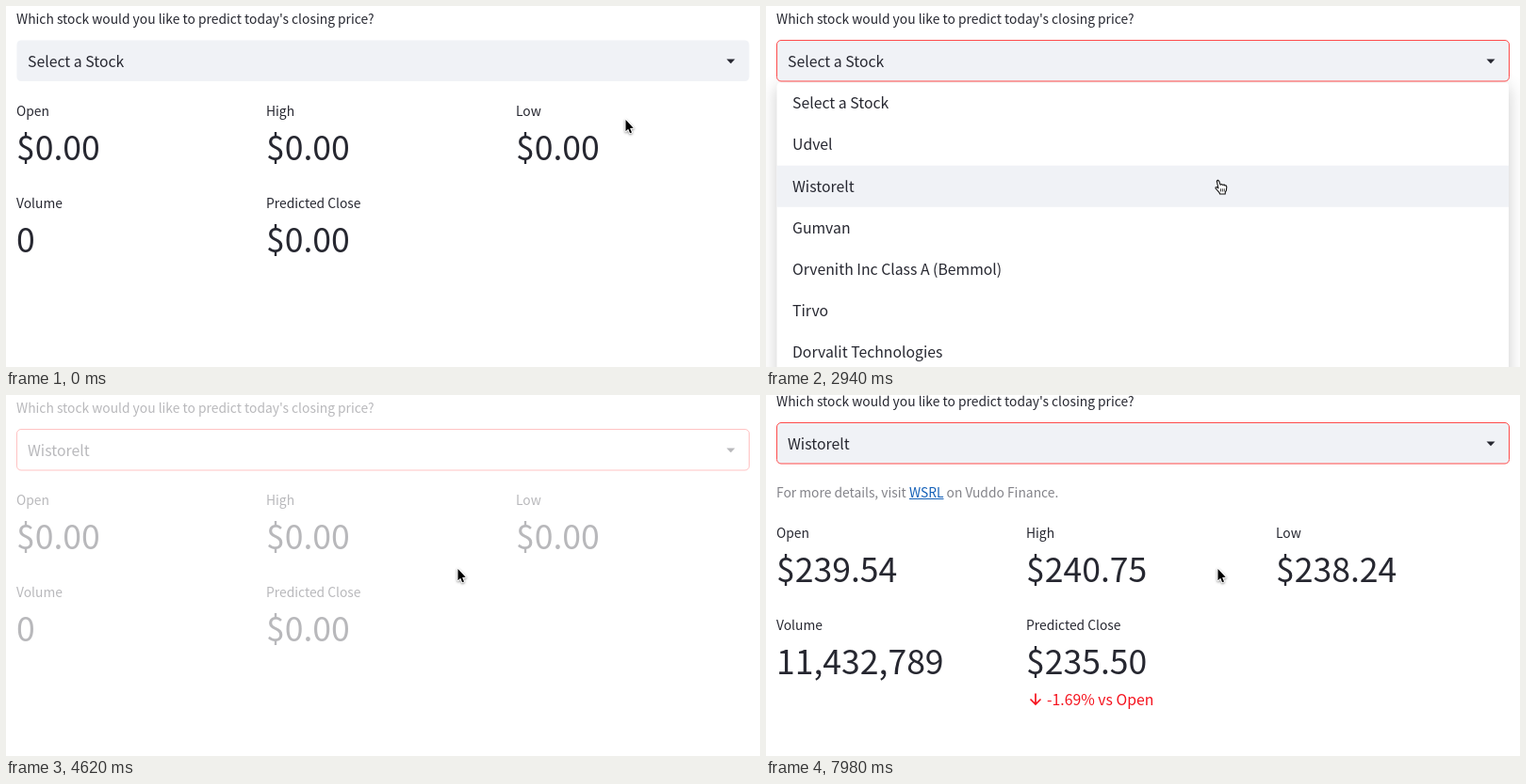
Recreate the animation shown at these times as an HTML page with a canvas. Size 800x384 px, loop 8000 ms.

```html
<!DOCTYPE html>
<html lang="en">
<head>
<meta charset="utf-8">
<title>Closing price predictor</title>
<style>
  html, body { margin: 0; width: 100%; height: 100%; overflow: hidden; background: #fff; }
  canvas { display: block; }
</style>
</head>
<body>
<canvas id="stage" width="800" height="384"></canvas>
<script>
const ctx = document.getElementById('stage').getContext('2d');

const LOOP = 8000;
const OPEN_AT = 2030, CLOSE_AT = 3150, FADE_AT = 3600, RESULT_AT = 7350;
const FAMILY = '"Noto Sans CJK JP", "Noto Sans CJK SC", "Noto Sans CJK", "Open Sans", sans-serif';
const SMALL = 13.83, BODY = 15.8, BIG = 35.55;
const INK = '#262730', PANEL = '#f0f2f6', RED = '#ff4b4b';
const ROW_TOP = 81.5, ROW = 44.1;
const PICK = 'Wistorelt';
const OPTIONS = ['Select a Stock', 'Udvel', PICK, 'Gumvan',
  'Orvenith Inc Class A (Bemmol)', 'Tirvo', 'Dorvalit Technologies'];
const EMPTY = ['$0.00', '$0.00', '$0.00', '0', '$0.00'];
const RESULT = ['$239.54', '$240.75', '$238.24', '11,432,789', '$235.50'];
const LABELS = ['Open', 'High', 'Low', 'Volume', 'Predicted Close'];

const clamp = v => Math.max(0, Math.min(1, v));
const ease = v => v * v * (3 - 2 * v);
const progress = (t, from, to) => clamp((t - from) / (to - from));

// Draws a line of text and returns the x where it ends.
function text(str, x, y, size, color = INK) {
  ctx.font = `400 ${size}px ${FAMILY}`;
  ctx.fillStyle = color;
  ctx.fillText(str, x, y);
  return x + ctx.measureText(str).width;
}

function roundBox(x, y, w, h, r) {
  ctx.beginPath();
  ctx.roundRect(x, y, w, h, r);
}

function pointer(t) {
  const up = ease(progress(t, 140, 1400));
  const down = ease(progress(t, 2170, 2660));
  return {
    x: 657 - 115 * up - 63 * down,
    y: 121 - 67 * up + 131 * down
  };
}

function opacity(t) {
  if (t >= RESULT_AT) return 1;
  return 1 - 0.67 * Math.pow(progress(t, FADE_AT, FADE_AT + 1000), 1.7);
}

function drawSelect(t, top, alpha) {
  const focused = t >= OPEN_AT;
  roundBox(11.5, top, 777, 43.5, 4.5);
  if (alpha > 0.34) {
    ctx.fillStyle = PANEL;
    ctx.fill();
  }
  if (focused) {
    ctx.strokeStyle = RED;
    ctx.lineWidth = 1;
    ctx.stroke();
  }
  text(t < CLOSE_AT ? OPTIONS[0] : PICK, 23, top + 28, BODY);

  ctx.fillStyle = INK;
  ctx.beginPath();
  ctx.moveTo(764.5, top + 20);
  ctx.lineTo(773.5, top + 20);
  ctx.lineTo(769, top + 24.8);
  ctx.fill();

  const caretOn = t > FADE_AT && (t - 4060 + 1050) % 1050 < 490;
  if (caretOn) ctx.fillRect(94, top + 10.5, 1, 22);
}

function drawMetrics(values, shift) {
  LABELS.forEach((label, i) => {
    const x = 11 + 265 * (i % 3);
    const y = 117 + shift + 98 * Math.floor(i / 3);
    text(label, x, y, SMALL);
    text(values[i], x, y + 47, BIG);
  });
}

function drawCaption() {
  const grey = '#838389', blue = '#1460b8', y = 109;
  const start = text('For more details, visit ', 11, y, SMALL, grey);
  const end = text('WSRL', start, y, SMALL, blue);
  ctx.fillRect(start, y + 1, end - start, 1);
  text(' on Vuddo Finance.', end, y, SMALL, grey);
}

function drawDelta() {
  const red = '#f5121d';
  ctx.strokeStyle = red;
  ctx.lineWidth = 1.7;
  ctx.beginPath();
  ctx.moveTo(286, 317.5);
  ctx.lineTo(286, 329);
  ctx.moveTo(280.5, 323.5);
  ctx.lineTo(286, 329);
  ctx.lineTo(291.5, 323.5);
  ctx.stroke();
  text('-1.69% vs Open', 298, 329.5, BODY, red);
}

function drawMenu(mouse) {
  ctx.save();
  ctx.shadowColor = 'rgba(0,0,0,.2)';
  ctx.shadowBlur = 18;
  ctx.shadowOffsetY = 4;
  ctx.fillStyle = '#fff';
  roundBox(11.5, ROW_TOP, 776.5, 340, 4);
  ctx.fill();
  ctx.restore();

  const hover = Math.max(0, Math.floor((mouse.y - ROW_TOP) / ROW));
  ctx.fillStyle = PANEL;
  ctx.fillRect(11.5, ROW_TOP + hover * ROW, 776.5, ROW);
  OPTIONS.forEach((name, i) => text(name, 28, 109.3 + i * ROW, BODY));
}

function polygon(points) {
  ctx.beginPath();
  points.forEach(([x, y]) => ctx.lineTo(x, y));
  ctx.closePath();
}

function drawArrow() {
  polygon([[0.5, 0], [0.5, 12.2], [3.2, 9.8], [5.1, 14.2], [7, 13.4], [5.1, 9.1], [8.7, 8.8]]);
  ctx.lineJoin = 'round';
  ctx.strokeStyle = '#fff';
  ctx.lineWidth = 2;
  ctx.shadowColor = 'rgba(0,0,0,.45)';
  ctx.shadowBlur = 2.5;
  ctx.shadowOffsetY = 1;
  ctx.stroke();
  ctx.shadowColor = 'transparent';
  ctx.fillStyle = '#000';
  ctx.fill();
}

function drawBeam() {
  ctx.beginPath();
  for (const side of [-1, 1]) {
    ctx.moveTo(0.5 + side * 3, -6.5);
    ctx.quadraticCurveTo(0.5, -6.5, 0.5, -4.5);
    ctx.lineTo(0.5, 5);
    ctx.quadraticCurveTo(0.5, 7, 0.5 + side * 3, 7);
  }
  ctx.moveTo(-1, 3);
  ctx.lineTo(2, 3);
  ctx.strokeStyle = '#222';
  ctx.lineWidth = 1;
  ctx.stroke();
}

function drawHand() {
  polygon([[-0.7, 1.2], [0.4, 0.3], [1.7, 1.2], [3, 5.2], [4.6, 4.6], [5.6, 5.4], [7, 4.9],
    [7.8, 6], [9, 5.9], [9.8, 7.2], [9.4, 11.2], [8.3, 13], [8.2, 15], [2.6, 15],
    [1.9, 13.3], [-2, 9], [-1.8, 7.7], [-0.4, 7.8], [0.9, 8.8]]);
  ctx.lineJoin = 'round';
  ctx.fillStyle = '#fff';
  ctx.fill();
  ctx.strokeStyle = '#111';
  ctx.lineWidth = 1.1;
  ctx.stroke();
  ctx.beginPath();
  for (const x of [3.5, 5.4, 7.3]) {
    ctx.moveTo(x, 9.3);
    ctx.lineTo(x, 12.5);
  }
  ctx.lineWidth = 0.8;
  ctx.stroke();
}

function drawPointer(mouse, menuOpen) {
  ctx.save();
  ctx.translate(mouse.x, mouse.y);
  if (mouse.y < 80) drawBeam();
  else if (menuOpen) drawHand();
  else drawArrow();
  ctx.restore();
}

function draw(t) {
  const done = t >= RESULT_AT;
  const menuOpen = t >= OPEN_AT && t < CLOSE_AT;
  const mouse = pointer(t);
  const scroll = done ? 7 : 0;
  const alpha = opacity(t);

  ctx.globalAlpha = 1;
  ctx.fillStyle = '#fff';
  ctx.fillRect(0, 0, 800, 384);

  ctx.globalAlpha = alpha;
  text("Which stock would you like to predict today's closing price?", 11, 19 - scroll, SMALL);
  if (menuOpen) {
    drawMenu(mouse);
  } else {
    drawMetrics(done ? RESULT : EMPTY, done ? 35 : 0);
  }
  drawSelect(t, 36.5 - scroll, alpha);
  if (done) {
    drawCaption();
    drawDelta();
  }

  ctx.globalAlpha = 1;
  drawPointer(mouse, menuOpen);
}

function tick() {
  draw(performance.now() % LOOP);
  requestAnimationFrame(tick);
}
tick();
</script>
</body>
</html>
```
